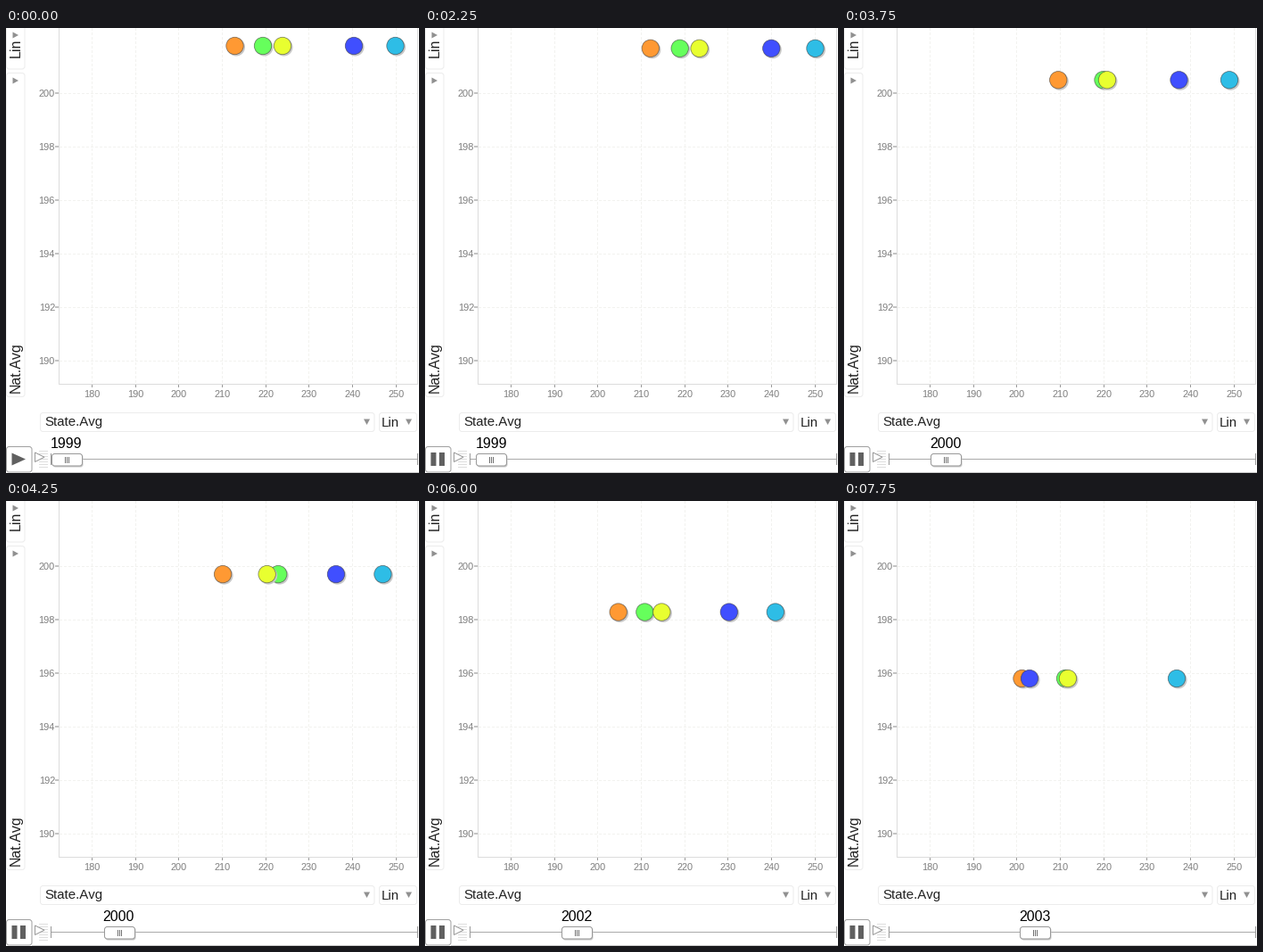
Recreate the animation shown at these times as a matplotlib script. Size 463 by 499 pixels, loop 8000 ms.

```python
import matplotlib.pyplot as plt
import numpy as np
from matplotlib.animation import FuncAnimation
from matplotlib.patches import Circle, FancyBboxPatch, Polygon, Rectangle

W, H, DPI = 463, 499, 64
FRAMES, STEP = 32, 250
PT = 72 / DPI
PLAY_AT = 2000
FIRST_YEAR, YEAR_WIDTH = 1999, 33.6

plt.rcParams["font.family"] = "Liberation Sans"
plt.rcParams["path.snap"] = False        # keep half-pixel lines where they are
plt.rcParams["text.kerning_factor"] = 6  # practically no kerning
fig = plt.figure(figsize=(W / DPI, H / DPI), dpi=DPI, facecolor="white")
ax = fig.add_axes([0, 0, 1, 1])
ax.set_xlim(0, W)
ax.set_ylim(H, 0)
ax.axis("off")


def line(xs, ys, color, z=1, width=1, **kw):
    return ax.plot(xs, ys, color=color, lw=width * PT, zorder=z,
                   solid_capstyle="butt", **kw)[0]


def label(x, y, text, px, color="#222222", **kw):
    return ax.text(x, y, text, fontsize=px * PT, color=color,
                   va="baseline", zorder=6, **kw)


def box(x, y, w, h, edge, face="white", radius=3, z=2):
    return ax.add_patch(FancyBboxPatch(
        (x, y), w, h, boxstyle=f"round,pad=0,rounding_size={radius}",
        fc=face, ec=edge, lw=PT, zorder=z))


def poly(points, face, edge="none", z=5):
    return ax.add_patch(Polygon(points, fc=face, ec=edge, lw=PT, zorder=z))


def down_arrow(x, y):
    poly([(x - 3.5, y - 3), (x + 3.5, y - 3), (x, y + 3.5)], "#909090")


def right_arrow(x, y):
    poly([(x - 3, y - 3.5), (x - 3, y + 3.5), (x + 3.5, y)], "#909090")


# Plot area with grid and ticks
for k in range(8):
    x = round(96 + 48.65 * k) + 0.5
    line([x, x], [0, 399], "#f2f2ef", dashes=(3, 2))
    line([x, x], [400, 403], "#999999")
    label(x, 414, str(180 + 10 * k), 11, "#808080", ha="center")
for k in range(6):
    y = 73.5 + 60 * k
    line([60, 461], [y, y], "#f2f2ef", dashes=(3, 2))
    line([55, 60], [y - 0.5, y - 0.5], "#888888")
    label(55, y + 3.5, str(200 - 2 * k), 11, "#808080", ha="right")
line([59.5, 59.5, 461.5, 461.5], [0, 399.5, 399.5, 0], "#dcdcdc")

# Axis selectors
PANEL = "#ececec"
box(0.5, -10, 20.5, 56, PANEL)
box(0.5, 50.5, 20.5, 363, PANEL)
right_arrow(10.5, 8)
right_arrow(10.5, 59)
vertical = dict(rotation=90, rotation_mode="anchor", ha="left")
label(16, 33, "Lin", 16, **vertical)
label(16, 409, "Nat.Avg", 16, **vertical)
box(38.5, 431.5, 374.5, 21, PANEL)
box(418.5, 431.5, 42, 21, PANEL)
label(43.5, 446, "State.Avg", 15)
label(420.5, 447, "Lin", 15)
down_arrow(404.5, 441.5)
down_arrow(451.5, 441.5)

# Play controls
line([29, W], [498.5, 498.5], "#cccccc")
box(0.5, 469.5, 28.5, 28.5, "#a0a0a0")
play_icon = poly([(6.5, 476.5), (6.5, 490.5), (22, 483.5)], "#606060")
pause_icon = [ax.add_patch(Rectangle((x, 476), 6, 15, fc="#606060", zorder=5))
              for x in (6.5, 16)]
for y in np.arange(474.5, 494, 3):
    line([37, 47], [y, y], "#dedede")
poly([(32.5, 476), (32.5, 486.5), (43, 481.2)], "white", "#999999", z=3)
line([50, 462], [483.5, 483.5], "#aaaaaa")
for x in (50.5, 461.5):
    line([x, x], [477, 490], "#999999")

# Slider handle
shadow = box(0, 478.5, 34, 14, "none", "#c8c8c8", z=3)
handle = box(0, 477.5, 34, 13.5, "#999999", z=4)
grips = [line([0, 0], [481, 488], "#707070", z=5) for _ in range(3)]
year_text = label(0, 471, "", 16, "black", ha="center")

# Bubble x per year; all bubbles share the same y
BUBBLES = {
    "#ff9933": (256.5, 237.4, 245, 217.3, 200.6, 197.5),
    "#66ff5c": (288, 275.9, 315.2, 246.1, 252.8, 239.5),
    "#e8ff30": (310, 297.4, 291, 265.4, 263.9, 228),
    "#404fff": (390, 381, 366.2, 346, 208.6, 207),
    "#2ebde6": (436.5, 441.5, 415.9, 393.4, 377.4, 365.2),
}
HEIGHTS = (20, 34.6, 98.3, 122.7, 171, 248.8)
YEARS = range(6)

bubbles = []
for n, (color, path) in enumerate(BUBBLES.items()):
    shade = ax.add_patch(Circle((0, 0), 10, fc="#c8c8c8", ec="none", zorder=7 + n))
    disc = ax.add_patch(Circle((0, 0), 9.7, fc=color, ec=(0.2, 0.2, 0.2, 0.6),
                               lw=0.8 * PT, zorder=7.5 + n))
    bubbles.append((shade, disc, path))


def slider_x(ms):
    return np.interp(ms, (PLAY_AT, 2250, 3250, 5000, 6750, 7750),
                     (68, 74.5, 101.5, 145.5, 188.5, 214.5))


def update(frame):
    ms = frame * STEP
    x = slider_x(ms)
    age = (x - 68) / YEAR_WIDTH

    playing = ms >= PLAY_AT
    play_icon.set_visible(not playing)
    for bar in pause_icon:
        bar.set_visible(playing)

    left = round(x - 17.01) + 0.5
    handle.set_x(left)
    shadow.set_x(left + 1)
    for k, grip in enumerate(grips):
        gx = left + 15 + 2 * k
        grip.set_xdata([gx, gx])
    year_text.set_x(x - 0.5)
    year_text.set_text(str(FIRST_YEAR + int(age)))

    y = np.interp(age, YEARS, HEIGHTS)
    for shade, disc, path in bubbles:
        bx = np.interp(age, YEARS, path)
        disc.center = bx, y
        shade.center = bx + 1.5, y + 1.5


anim = FuncAnimation(fig, update, frames=FRAMES, interval=STEP,
                     init_func=lambda: update(0), repeat=True, repeat_delay=0)
plt.show()
```
